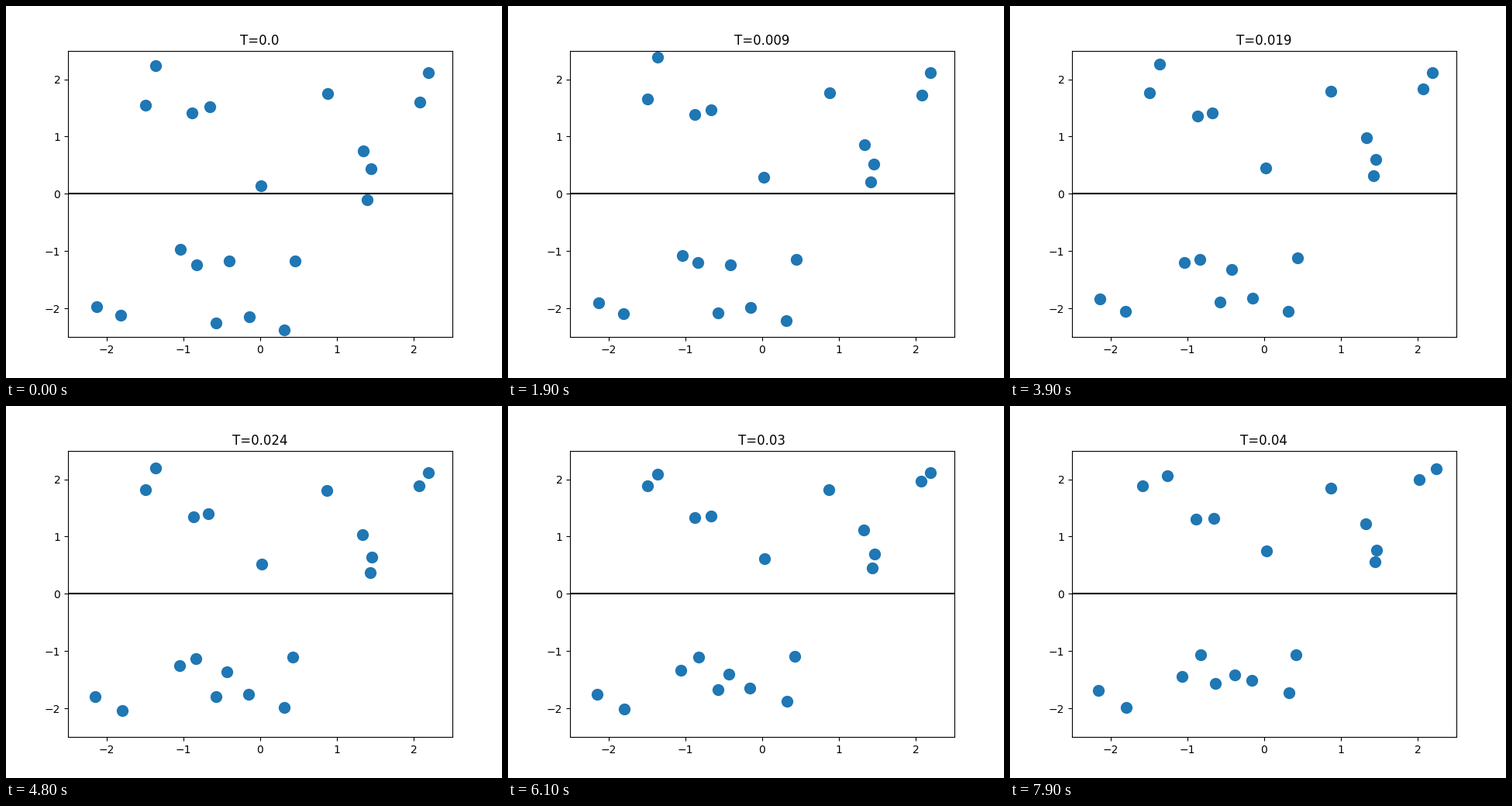
These frames come from a looping animation (640x480 px, 8 s). A matplotlib script:

```python
from itertools import combinations

import numpy as np
import matplotlib.pyplot as plt
from matplotlib.animation import FuncAnimation

FRAMES, INTERVAL = 80, 100
DT = 1 / 2000
BOX = 2.5      # half width of the container
R = 0.1        # particle radius

# Initial state of the gas: x, y, vx, vy
GAS = np.array([
    (-1.356, 2.242, -0.06, 15.8), (-1.487, 1.542, -0.10, 11.4),
    (-0.884, 1.414, 0.75, -2.7), (-0.655, 1.519, -0.80, -5.2),
    (0.875, 1.746, -0.26, 2.5), (2.192, 2.121, -0.12, 0.0),
    (2.074, 1.608, -0.20, 11.6), (1.338, 0.743, -0.46, 12.0),
    (1.446, 0.442, 0.38, 8.2), (0.010, 0.147, 0.54, 15.3),
    (1.391, -0.105, 0.89, 11.7), (-1.036, -0.962, -0.05, -12.2),
    (-0.825, -1.235, -0.77, 4.35), (-0.406, -1.165, -0.99, -7.9),
    (0.449, -1.165, -0.94, 2.5), (-2.122, -1.966, -0.89, 7.0),
    (-1.810, -2.122, 0.48, 3.5), (-0.570, -2.260, -0.17, 19.35),
    (-0.142, -2.139, -0.51, 16.0), (0.312, -2.374, 0.23, 16.5),
])


def bounce_walls(pos, vel):
    out = (np.abs(pos) > BOX - R) & (pos * vel > 0)
    vel[out] *= -1


def pass_barrier(pos, vel):
    """Carry particles that touch the middle line to its other side."""
    y, vy = pos[:, 1], vel[:, 1]
    hit = (np.abs(y) < R) & (y * vy < 0)
    pos[hit] += 2 * R * vel[hit] / np.abs(vy[hit])[:, None]


def collide(pos, vel):
    """Elastic collisions between equal masses."""
    for a, b in combinations(range(len(pos)), 2):
        gap = pos[a] - pos[b]
        dist = np.hypot(*gap)
        if dist < 2 * R:
            n = gap / dist
            closing = (vel[a] - vel[b]) @ n
            if closing < 0:
                vel[a] -= closing * n
                vel[b] += closing * n


def simulate():
    pos, vel = GAS[:, :2].copy(), GAS[:, 2:].copy()
    history = [pos.copy()]
    for _ in range(FRAMES - 1):
        pos += vel * DT
        bounce_walls(pos, vel)
        pass_barrier(pos, vel)
        collide(pos, vel)
        history.append(pos.copy())
    return history


history = simulate()

fig, ax = plt.subplots(figsize=(6.4, 4.8), dpi=100)
ax.set(xlim=(-BOX, BOX), ylim=(-BOX, BOX))
ax.plot([-BOX, BOX], [0, 0], color="black", lw=1.5)
dots, = ax.plot([], [], "o", color="C0", ms=10)
# Half a pixel left and down, so the text rounds down to whole pixels.
title = ax.set_title("T=0.0", x=0.499, pad=5.64)


def update(i):
    dots.set_data(*history[i].T)
    title.set_text(f"T={round(i * DT, 3)}")
    return dots, title


anim = FuncAnimation(fig, update, frames=FRAMES, interval=INTERVAL,
                     repeat=True, repeat_delay=0, blit=False)
plt.show()
```
